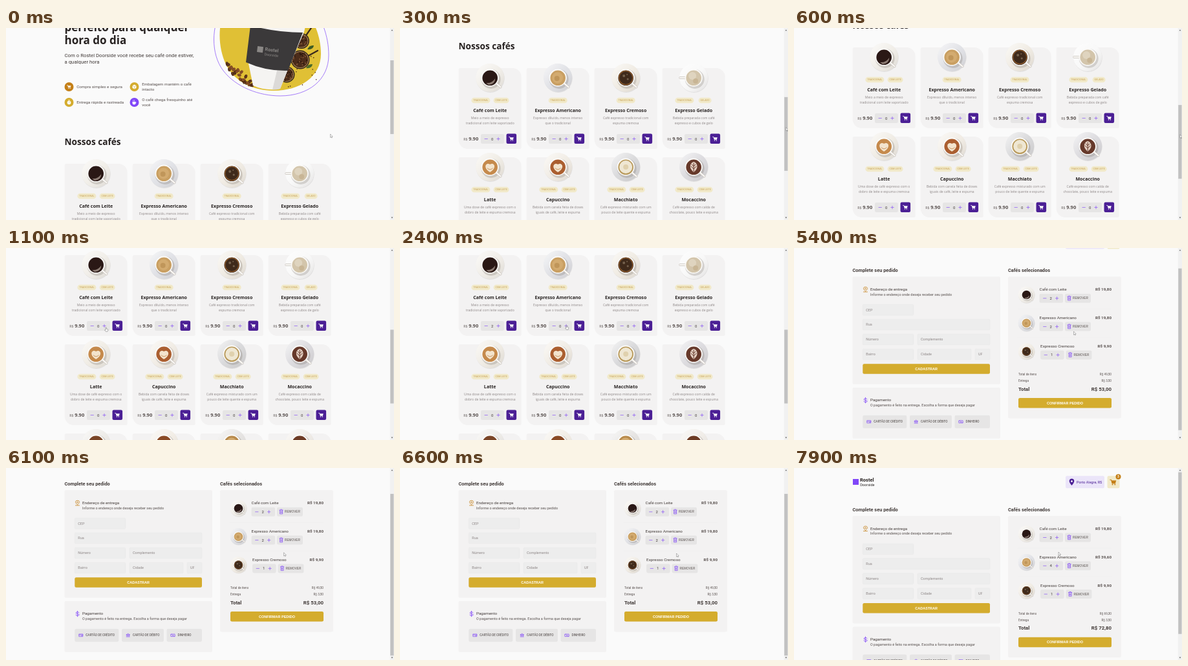
These frames come from a looping animation (600x297 px, 8 s). An HTML page:

```html
<!DOCTYPE html>
<html lang="pt-BR">
<head>
<meta charset="utf-8">
<title>Cafés</title>
<style>
html, body { margin: 0; width: 100%; height: 100%; overflow: hidden; background: #fafafa; }
svg { display: block; width: 100vw; height: 100vh; }
text { font-family: Roboto, sans-serif; white-space: pre; }
.round { font-family: "Open Sans", sans-serif; }
.arial { font-family: "Liberation Sans", Arial, sans-serif; }
.b { font-weight: 700; }
.mid { text-anchor: middle; }
.end { text-anchor: end; }
.line { fill: none; stroke: currentColor; stroke-linecap: round; stroke-linejoin: round; }
</style>
</head>
<body>
<svg id="stage" viewBox="0 0 600 297" preserveAspectRatio="none"></svg>
<script>
const LOOP = 8000, STEP = 100, CART_AT = 4500;
const INK = '#272221', TEXT = '#574f4d', SUB = '#403937', MUTED = '#8d8686',
  PANEL = '#f3f2f2', FIELD = '#ededed', BTN = '#e6e5e5',
  GOLD = '#d4ac2e', AMBER = '#c47f17', CREAM = '#f1e9c9',
  PURPLE = '#8047f8', DEEP = '#4b1f95';

// --- drawing helpers -------------------------------------------------
const text = (x, y, str, size, fill = TEXT, cls = '', id = '') =>
  `<text x="${x}" y="${(y + size * .35).toFixed(2)}" font-size="${size}" fill="${fill}" class="${cls}"${id && ` id="${id}"`}>${str}</text>`;
const box = (x, y, w, h, fill, r = 2.3, more = '') =>
  `<rect x="${x}" y="${y}" width="${w}" height="${h}" rx="${r}" fill="${fill}" ${more}/>`;
const disc = (x, y, r, fill, more = '') => `<circle cx="${x}" cy="${y}" r="${r}" fill="${fill}" ${more}/>`;
const shape = (d, fill, more = '') => `<path d="${d}" fill="${fill}" ${more}/>`;
const line = (d, color, w = .7) => `<path class="line" d="${d}" color="${color}" stroke-width="${w}"/>`;
const move = (x, y, body, s = 1) => `<g transform="translate(${x} ${y}) scale(${s})">${body}</g>`;
const gradient = (id, dir, ...stops) => `<linearGradient id="${id}" x1="0" y1="0" ${dir}>` +
  stops.map(([o, c, a]) => `<stop offset="${o}" stop-color="${c}" stop-opacity="${a}"/>`).join('') + '</linearGradient>';

const basket = (x, y, color, s = 1) => move(x, y,
  line('M-3.6-2.8H-2.3L-1.2 1.2H2.4', color, .8) + shape('M-2.2-2H3.5L2.6.7H-1.4Z', color) +
  disc(-.8, 2.6, .75, color) + disc(2, 2.6, .75, color), s);

const seeded = seed => () => (seed = (seed * 16807) % 2147483647) / 2147483647;

// Cup seen from above: saucer, cup, drink, foam
const drinks = [
  ['#f0ede7', '#2a1815', 'black'],
  ['#dedfe4', '#c99f62', 'crema'],
  ['#efeae1', '#3f2a1b', 'dark'],
  ['#f8f8f8', '#d3c5ab', 'ice'],
  ['#efebe3', '#c58a4c', 'heart'],
  ['#f0ebe3', '#ab5f30', 'heart'],
  ['#d6d6d8', '#b99a5c', 'foam'],
  ['#d9d8dc', '#66392b', 'leaf'],
  ['#eceae6', '#7a4526', ''],
  ['#f1ece4', '#8a4a25', ''],
  ['#e4e2e0', '#b88a4c', 'crema'],
  ['#efebe6', '#6d3b24', '']
];
const foam = {
  '': '',
  black: shape('M-6 8Q3 9 8 1Q8 10-2 11Z', '#8b7a72'),
  crema: disc(-.5, 0, 8.4, '#d3ab70') + disc(-1.5, 1, 4, '#c0965a'),
  dark: disc(0, 0, 10.6, 'none', 'stroke="#8c5a2c" stroke-width="1.2"') + disc(-3, -3, 2, '#74614d') + disc(3, 2, 1.6, '#74614d') + disc(2, -5, 1, '#74614d'),
  ice: disc(-2, -3, 6, '#dfd4bf') + disc(3, 5, 4, '#c8b595'),
  heart: shape('M0 8C-12 1-6-8 0-4C6-8 12 1 0 8Z', '#f3e4cd') + line('M-4 2Q0 6 4 2', '#c99661', 1),
  foam: disc(0, 0, 10, '#efe7d3') + disc(0, 0, 4, '#e0d1ad'),
  leaf: shape('M0 8C-9 1-5-7 0-8C5-7 9 1 0 8Z', '#e3cfc2') + line('M0 7V-6M-4-1L0 3L4-1M-3-4L0-1L3-4', '#66392b', 1)
};
function cup(x, y, i, s = 1) {
  const [plate, drink, top] = drinks[i];
  const handle = top === 'ice' ? 'M-13 0H-21' : 'M10 9L16.5 14.5';
  return move(x, y,
    disc(.5, 1, 22, '#000', 'opacity=".08"') + disc(0, 0, 22, plate) + disc(0, 0, 22, 'url(#gloss)') +
    disc(1.5, 2, 15, '#5b5048', 'opacity=".2"') + line(handle, '#b9b2aa', 3.4) + line(handle, '#f8f6f3', 2.4) +
    disc(0, 0, 13.6, '#fbfaf8') + disc(0, .3, 11.8, drink) + foam[top], s);
}

const counter = (x, y, w, h, id, n) => {
  const c = y + h / 2;
  return box(x, y, w, h, BTN) + line(`M${x + 6} ${c}h4.4M${x + 24.8} ${c}h4.4M${x + 27} ${c - 2.2}v4.4`, PURPLE, .65) +
    text(x + 17.7, c, n, 6, SUB, 'mid', id);
};

// --- shop page -------------------------------------------------------
const MILK = 'COM LEITE';
const coffees = [
  ['Café com Leite', MILK, 'Meio a meio de expresso', 'tradicional com leite vaporizado'],
  ['Expresso Americano', '', 'Expresso diluído, menos intenso', 'que o tradicional'],
  ['Expresso Cremoso', '', 'Café expresso tradicional com', 'espuma cremosa'],
  ['Expresso Gelado', 'GELADO', 'Bebida preparada com café', 'expresso e cubos de gelo'],
  ['Latte', MILK, 'Uma dose de café expresso com o', 'dobro de leite e espuma cremosa'],
  ['Capuccino', MILK, 'Bebida com canela feita de doses', 'iguais de café, leite e espuma'],
  ['Macchiato', MILK, 'Café expresso misturado com um', 'pouco de leite quente e espuma'],
  ['Mocaccino', MILK, 'Café expresso com calda de', 'chocolate, pouco leite e espuma'],
  ['Mocha', MILK, '', ''], ['Chocolate', MILK, '', ''], ['Cubano', MILK, '', ''], ['Havaiano', MILK, '', '']
];
const tag = (cx, y, w, str) => box(cx - w / 2, y - 4.3, w, 8.6, CREAM, 4.3) + text(cx, y, str, 3.7, '#c9a458', 'mid');

function card([name, extra, l1, l2], i) {
  const tags = extra
    ? tag(-14.3, 50, 29, 'TRADICIONAL') + tag(17.4, 50, extra === MILK ? 24 : 20, extra)
    : tag(0, 50, 29, 'TRADICIONAL');
  return move(139.2 + 105 * (i % 4), 210 + 138 * Math.floor(i / 4),
    shape('M-46.4 0H34.5A14 14 0 0 1 48.5 14V122.7A2.3 2.3 0 0 1 46.2 125H-34.5A14 14 0 0 1-48.5 111V2.3A2.3 2.3 0 0 1-46.4 0Z', PANEL) +
    cup(0, 15, i) + tags +
    text(0, 66, name, 7.1, INK, 'round b mid') +
    text(0, 77.6, l1, 5.05, MUTED, 'round mid') + text(0, 85, l2, 5.05, MUTED, 'round mid') +
    text(-41, 110, 'R$', 5.2, TEXT, 'round') + text(-33, 109, '9.90', 7.5, TEXT, 'round b') +
    counter(-14.2, 102, 36, 15, 'q' + i, 0) +
    box(25.3, 101.5, 15.6, 15.6, DEEP) + basket(33.1, 109.3, '#fff'));
}

function hero() {
  const rnd = seeded(11);
  const bean = (x, y) => `<g transform="translate(${x.toFixed(1)} ${y.toFixed(1)}) rotate(${(rnd() * 180).toFixed(0)})">` +
    `<ellipse rx="3.2" ry="2.2" fill="${rnd() < .5 ? '#4a2512' : '#7a4320'}"/>` + line('M-2.4 0Q0-.8 2.4 0', '#c08a55', .4) + '</g>';
  let beans = '', specks = '';
  for (let i = 0; i < 24; i++) {
    const u = i / 23;
    beans += bean(342 + 39 * u, 62 + 22 * u + (rnd() - .5) * 13);
  }
  for (let i = 0; i < 20; i++) specks += disc((432 + rnd() * 48).toFixed(1), (38 + rnd() * 54).toFixed(1), .8, '#4a2a16');
  const bowl = (x, y, r) => {
    let grains = '';
    for (let i = 0; i < 30; i++) {
      const a = rnd() * 6.28, d = Math.sqrt(rnd()) * (r - 3);
      grains += disc((x + d * Math.cos(a)).toFixed(1), (y + d * Math.sin(a)).toFixed(1), 1.1, i % 2 ? '#7d5233' : '#2c170d');
    }
    return disc(x, y, r, '#30241a') + disc(x, y, r - 1.4, '#b08a58') + disc(x, y, r - 2.4, '#4b2c1a') + grains;
  };
  const leaf = 'M0 0Q3-7 10-6Q9 1 0 0Z';
  return shape('M334-30C318-4 316 40 336 66C356 92 392 105 424 105C468 105 499 80 499 42C499 12 488-16 470-40', 'none', `stroke="${PURPLE}" stroke-width=".7"`) +
    shape('M345-40C326-12 327 28 340 56C352 82 382 97 414 97C454 97 487 76 487 40C487 10 474-20 450-40Z', '#e0c035') +
    specks + move(466, 33, shape(leaf, '#3d5c24')) + move(464, 62, shape(leaf, '#4b6b2a')) +
    line('M458 20L474-3M462 46L482 35', '#3a2a1d', 2.2) +
    bowl(457, 20, 12) + bowl(455, 49, 14.5) + bowl(434, 72, 12.5) + beans +
    shape('M382-24L466-16L461 6L436 64L424 94Q402 98 382 89L374 50Z', '#f5f4f2') + shape('M420 62L436 64L424 94Q419 95.5 412 95.5Z', '#dcdad8') +
    shape('M378-4Q418 7 459 7L436 66Q402 67 371 53Z', '#3b393a') +
    `<g transform="rotate(7 404 38)">` + box(388, 30, 9, 9, '#8b8886', 0) +
    text(400, 33, 'Rostel', 7.3, '#8b8886', 'b') + text(400, 41, 'Doorside', 5.4, '#8b8886') + '</g>';
}

const perk = (x, y, color, icon, lines) => disc(x, y, 7, color) + move(x, y, icon) +
  lines.map((s, i) => text(x + 11.7, y + (i - (lines.length - 1) / 2) * 8.2, s, 6.25)).join('');

const shop = hero() +
  text(90.5, -1, 'perfeito para qualquer', 17, INK, 'round b') +
  text(90.5, 19.5, 'hora do dia', 17, INK, 'round b') +
  text(90.5, 42, 'Com o Rostel Doorside você recebe seu café onde estiver,', 7.8, SUB) +
  text(90.5, 52, 'a qualquer hora', 7.8, SUB) +
  perk(97.5, 91, AMBER, basket(0, 0, '#fff', .85), ['Compra simples e segura']) +
  perk(198.5, 91, GOLD, shape('M0-3.4L3-1.8V1.8L0 3.4L-3 1.8V-1.8Z', '#fff') + line('M-3-1.8L0 0L3-1.8M0 0V3', GOLD, .5), ['Embalagem mantém o café', 'intacto']) +
  perk(97.5, 115, GOLD, disc(0, .4, 2.8, '#fff') + line('M-1-3.4H1', '#fff') + line('M0 .4L1.2-.8', GOLD, .6), ['Entrega rápida e rastreada']) +
  perk(198.5, 115, PURPLE, shape('M-3-1H2V1A2.4 2.4 0 0 1-3 1Z', '#fff') + line('M2-.5Q3.8-.3 2 1.6M-1.8-3.4V-2M0-3.4V-2', '#fff', .6), ['O café chega fresquinho até', 'você']) +
  text(90.5, 176, 'Nossos cafés', 13.6, INK, 'round b') +
  coffees.map(card).join('');

// --- checkout page ---------------------------------------------------
const field = (x, y, w, label) => box(x, y, w, 17, FIELD, 1.6, `stroke="${BTN}" stroke-width=".4"`) + text(x + 5, y + 8.5, label, 5.47, MUTED);
const action = (x, y, w, label) => box(x, y, w, 15.6, GOLD) + text(x + w / 2, y + 7.8, label, 5.47, '#fff', 'arial b mid');
const pay = (x, w, icon, label) => box(x, 288.5, w, 20, BTN) + move(x + 9.7, 298.5, icon) + text(x + 17, 298.5, label, 4.69, SUB);

function item(i, qty, dx) {
  const y = 94 + 43.8 * i, c = y + 13.5, x = 379.6 + dx;
  const trash = line('M-2.6-2.6H2.6M-1-3.6H1M-2-2.6V3.2H2V-2.6M-.7-.8V1.6M.7-.8V1.6', PURPLE, .7);
  return (i ? line(`M346 ${y - 13.5}H490`, '#ececec', .5) : '') +
    cup(359.5, y + 8, i, .58) + text(x, y, coffees[i][0], 6.25, SUB) +
    text(491, y, '', 6.25, TEXT, 'b end', 'sum' + i) +
    counter(x, c - 7, 36.5, 14, 'n' + i, qty) +
    box(x + 39.4, c - 7, 40, 14, BTN) + move(x + 46, c, trash) + text(x + 51.5, c, 'REMOVER', 4.69, TEXT, 'arial');
}

const checkout =
  box(91, 17, 9, 9, PURPLE, 0) + text(102, 18, 'Rostel', 7.5, INK, 'b') + text(102.2, 26.2, 'Doorside', 5.6, INK) +
  box(420, 12.3, 60, 19, '#ebe5f9') + shape('M429.5 27C423.5 21 425.5 16.5 429.5 16.5S435.5 21 429.5 27Z', DEEP) + disc(429.5, 20.5, 1.5, '#ebe5f9') +
  text(437, 22, 'Porto Alegre, RS', 5.47, DEEP) +
  box(484.5, 12.3, 19, 19, CREAM) + basket(493.6, 22, AMBER, 1.35) +
  disc(501.5, 13.5, 4, AMBER) + text(501.5, 13.5, '3', 5, '#fff', 'b mid') +
  text(90.5, 64, 'Complete seu pedido', 7.4, SUB, 'b') + text(331, 64, 'Cafés selecionados', 7.4, SUB, 'b') +
  box(90.5, 74, 228.5, 166.5, PANEL) + box(90.5, 245.5, 228.5, 79, PANEL) + box(331, 74, 175, 219.3, PANEL) +
  line('M110.5 96.5C105.5 92.5 107.5 90 110.5 90S115.5 92.5 110.5 96.5M107.5 97.6H113.5', AMBER, .8) + disc(110.5, 92.8, 1, 'none', `stroke="${AMBER}" stroke-width=".7"`) +
  text(118, 93.5, 'Endereço de entrega', 6.25, SUB) +
  text(118, 101.3, 'Informe o endereço onde deseja receber seu pedido', 5.47) +
  field(106.3, 117, 78.5, 'CEP') + field(106.3, 139.7, 196.7, 'Rua') +
  field(106.3, 162.7, 78.5, 'Número') + field(191, 162.7, 112, 'Complemento') +
  field(106.3, 185.7, 78.5, 'Bairro') + field(191, 185.7, 83, 'Cidade') + field(280, 185.7, 23, 'UF') +
  action(106.3, 208.9, 196.7, 'CADASTRAR') +
  line('M110.5 261V269.5M113 263.6Q112.6 262.4 110.5 262.4Q108.2 262.5 108.2 264Q108.2 265.2 110.5 265.3Q113.2 265.4 113.2 266.8Q113 268.2 110.5 268.2Q108.2 268.2 108 266.8', PURPLE, .8) +
  text(118, 264.5, 'Pagamento', 6.25, SUB) +
  text(118, 272.8, 'O pagamento é feito na entrega. Escolha a forma que deseja pagar', 5.47) +
  pay(106.3, 68, line('M-2.8-1.9H2.8V1.9H-2.8ZM-2.8-.6H2.8M.8 .8H1.8', PURPLE), 'CARTÃO DE CRÉDITO') +
  pay(179, 65, line('M-2.6-.9L0-2.6L2.6-.9ZM-1.8-.6V1.4M0-.6V1.4M1.8-.6V1.4M-2.6 2.2H2.6', PURPLE), 'CARTÃO DE DÉBITO') +
  pay(248.5, 54.5, line('M-2.9-1.8H2.9V1.8H-2.9ZM-1.8-1.8L-2.9-.7M1.8 1.8L2.9 .7', PURPLE) + disc(0, 0, .9, PURPLE), 'DINHEIRO') +
  item(0, 2, 0) + item(1, 2, 0) + item(2, 1, 1.5) +
  text(347, 225, 'Total de itens', 4.69) + text(491, 225, '', 4.69, TEXT, 'end', 'goods') +
  text(347, 235.3, 'Entrega', 4.69) + text(491, 235.3, 'R$ 3,50', 4.69, TEXT, 'end') +
  text(347, 247.7, 'Total', 7.8, SUB, 'b') + text(491, 247.7, '', 7.8, SUB, 'b end', 'total') +
  action(347, 261.7, 144, 'CONFIRMAR PEDIDO');

const bar = box(593.8, 0, 6.2, 297, '#f1f1f1', 0) +
  shape('M595.6 4.2L597 2.4L598.4 4.2ZM595.6 292.6L597 294.4L598.4 292.6Z', '#606060') +
  box(594.3, 0, 5.2, 10, '#c1c1c1', 0, 'id="thumb"');
const pointer =
  shape('M0 0V5.4L1.3 4.3L2.1 6L2.9 5.6L2.1 4H3.7Z', '#fff', 'id="arrow" stroke="#666" stroke-width=".45"') +
  shape('M-.9-3Q-.2-3.7.2-3V-.9L2.4-.3Q2.9 0 2.7 1.2L2 3.2H-.8L-2.4.9Q-2.2.1-.9.8Z', '#fff', 'id="hand" stroke="#555" stroke-width=".45"');
const defs = gradient('gloss', 'x2="1" y2="1"', [0, '#fff', .75], [.5, '#fff', .1], [1, '#6b625c', .16]);

document.getElementById('stage').innerHTML =
  `<defs>${defs}</defs><g id="shop">${shop}</g><g id="checkout">${checkout}</g>${bar}<g id="pointer">${pointer}</g>`;

// --- motion ----------------------------------------------------------
const shopScroll = [[0, 0], [100, 45], [200, 100], [300, 148], [600, 180], [900, 197], [1000, 199]];
const cartScroll = [[5100, 0], [5200, 8], [5300, 19], [5400, 29.7], [5600, 39.7], [6600, 39.7], [6700, 23], [6800, 7], [6900, 0]];
const path = [
  [0, 501.5, 164], [200, 597, 150], [900, 597, 176], [1100, 155, 126], [1800, 153, 123],
  [2000, 172, 123], [2200, 172, 123], [2400, 258, 123], [2700, 258, 123], [2900, 277, 123], [3100, 277, 123],
  [3300, 363, 123], [3500, 363, 123], [3800, 376, 125], [4200, 379, 123], [4500, 494, 26], [4800, 490, 34],
  [5400, 432.5, 129], [6600, 427.5, 132], [7000, 408, 151], [7800, 408, 151], [7900, 409, 130]
];
const shopClicks = [[1500, 1800], [2500, 2700], [3400]];
const cartClicks = [7200, 7800];

function at(table, t) {
  const k = table.findIndex(row => row[0] > t);
  if (k < 0) return table[table.length - 1].slice(1);
  if (!k) return table[0].slice(1);
  const a = table[k - 1], b = table[k], u = (t - a[0]) / (b[0] - a[0]);
  return a.slice(1).map((v, i) => v + (b[i + 1] - v) * u);
}
const count = (times, t) => times.filter(x => x <= t).length;
const money = v => 'R$ ' + v.toFixed(2).replace('.', ',');
const $ = id => document.getElementById(id);
const show = (id, on) => $(id).setAttribute('visibility', on ? 'visible' : 'hidden');
const put = (id, x, y) => $(id).setAttribute('transform', `translate(${x} ${y})`);
const say = (id, v) => { if ($(id).textContent !== String(v)) $(id).textContent = v; };

function scrollbar(pos, height) {
  const top = 6.6, track = 283.8;
  $('thumb').setAttribute('y', top + pos / height * track);
  $('thumb').setAttribute('height', 297 / height * track);
}

function draw(t) {
  const inCart = t >= CART_AT;
  show('shop', !inCart);
  show('checkout', inCart);
  if (inCart) {
    const [y] = at(cartScroll, t);
    const qty = [2, 2 + count(cartClicks, t), 1];
    put('checkout', 0, -y);
    scrollbar(y, 337);
    qty.forEach((n, i) => { say('n' + i, n); say('sum' + i, money(n * 9.9)); });
    const goods = qty.reduce((a, b) => a + b) * 9.9;
    say('goods', money(goods));
    say('total', money(goods + 3.5));
  } else {
    const [y] = at(shopScroll, t);
    put('shop', 0, -y);
    scrollbar(113 + y, 739);
    shopClicks.forEach((times, i) => say('q' + i, count(times, t)));
  }
  const hand = (t >= 1100 && t < 4300) || (t >= 7000 && t < 7900);
  show('hand', hand);
  show('arrow', !hand);
  put('pointer', ...at(path, t));
}

const start = performance.now();
function tick() {
  const t = (performance.now() - start) % LOOP;
  draw(Math.floor(t / STEP) * STEP);
  requestAnimationFrame(tick);
}
tick();
</script>
</body>
</html>
```
